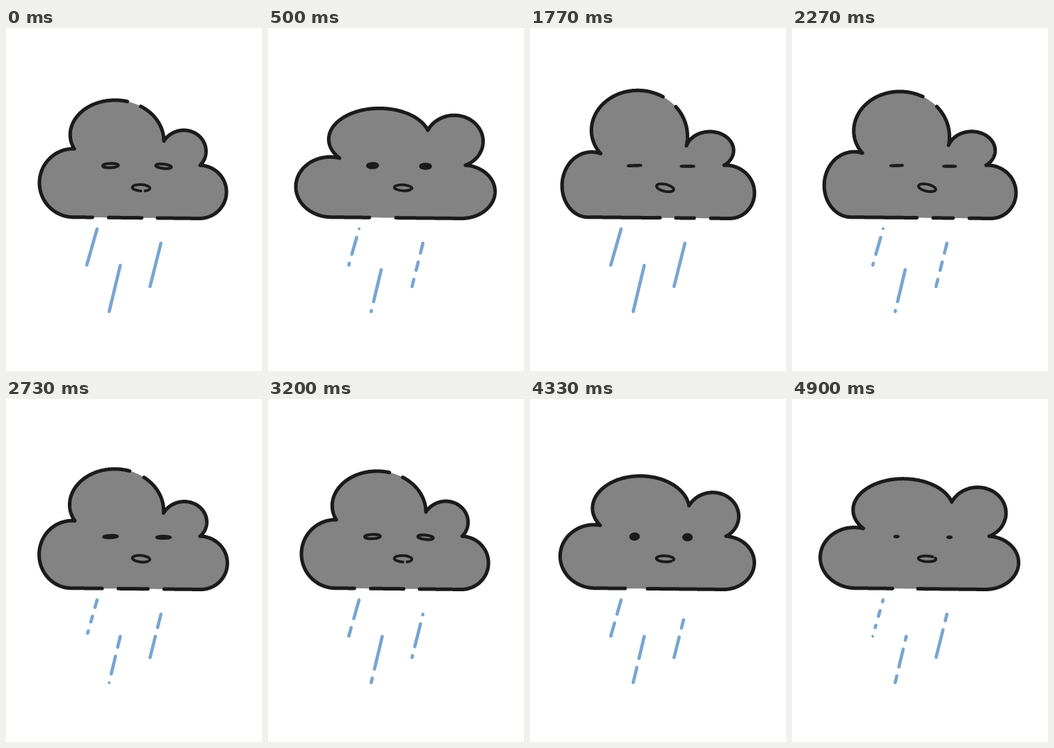
An HTML page with a canvas that plays this animation: 360x480 px, repeating every 5 s.

```html
<!DOCTYPE html>
<html lang="en">
<head>
<meta charset="utf-8">
<title>Rain cloud</title>
<style>
html, body { margin: 0; width: 100%; height: 100%; overflow: hidden; background: #fff; }
canvas { display: block; width: 100vw; height: 100vh; }
</style>
</head>
<body>
<canvas id="stage" width="360" height="480"></canvas>
<script>
const ctx = document.getElementById('stage').getContext('2d');
const INK = '#1c1a1b', GREY = '#838383', BLUE = '#78a5d1';
const LOOP = 5000, STEP = 80, RESTART = 4010;
const PEAK = 24.5, REST = 40;

// Lobes are ellipses: x, y, rx, ry; the side lobes stand on the floor: x, rx, ry
const rest = {
  big: [151.5, 154, 66, 53], puff: [251, 173.5, 31, 30],
  left: [95, 48, 48], right: [272, 38, 37], notchL: [96, 169], notchR: [222, 158]
};
const wide = {
  big: [157, 157, 73, 44], puff: [263, 158, 41, 37],
  left: [89, 50.5, 42.5], right: [272, 48, 38], notchL: [101, 183], notchR: [225, 142]
};
const tall = {
  big: [149, 144, 68, 63], puff: [254.5, 171, 34.5, 25],
  left: [75, 30.5, 41], right: [285, 33, 34], notchL: [101, 179], notchR: [219, 168]
};

// Eased value at a step between [step, value] keys
function track(keys, step) {
  const i = keys.findIndex(k => k[0] > step);
  if (i < 0) return keys.at(-1)[1];
  const [s0, a] = keys[i - 1], [s1, b] = keys[i];
  return a + (b - a) * (1 - Math.cos(Math.PI * (step - s0) / (s1 - s0))) / 2;
}

// 1 is squashed wide, -1 is stretched tall
function squashAt(step) {
  if (step > PEAK) return -((Math.max(0, REST - step) / (REST - PEAK)) ** 2);
  return track([[0, 0], [8, 1.1], [18, 0], [PEAK, -1]], step);
}

function shapeAt(squash) {
  const to = squash > 0 ? wide : tall, k = Math.abs(squash), shape = {};
  for (const part in rest) shape[part] = rest[part].map((v, i) => v + (to[part][i] - v) * k);
  return shape;
}

// Clockwise arc of an ellipse whose ends bend to meet two given points
function lobe([cx, cy, rx, ry], from, to) {
  const polar = ([x, y]) => {
    const u = (x - cx) / rx, v = (y - cy) / ry;
    return [Math.atan2(v, u), Math.hypot(u, v)];
  };
  const [a0, r0] = polar(from);
  let [a1, r1] = polar(to);
  if (a1 < a0) a1 += 2 * Math.PI;
  return Array.from({ length: 161 }, (_, i) => {
    const t = i / 160, a = a0 + (a1 - a0) * t;
    const r = 1 + (r0 - 1) * (1 - t) ** 4 + (r1 - 1) * t ** 4;
    return [cx + rx * r * Math.cos(a), cy + ry * r * Math.sin(a)];
  });
}

function line([x0, y0], [x1, y1]) {
  return Array.from({ length: 241 }, (_, i) => [x0 + (x1 - x0) * i / 240, y0 + (y1 - y0) * i / 240]);
}

function drawBody(squash) {
  const { big, puff, left, right, notchL, notchR } = shapeAt(squash);
  const out = Math.max(0, squash), up = Math.max(0, -squash);
  const notchLow = [273 + 5 * out, 192];
  const floorR = [right[0], 266.5], floorL = [left[0], 264.7];
  const side = ([x, rx, ry], floor) => [x, floor[1] - ry, rx, ry];

  const top = lobe(big, notchL, notchR), bottom = line(floorR, floorL);
  const parts = [top, lobe(puff, notchR, notchLow), lobe(side(right, floorR), notchLow, floorR),
    bottom, lobe(side(left, floorL), floorL, notchL)];

  ctx.beginPath();
  parts.flat().forEach(p => ctx.lineTo(...p));
  ctx.fillStyle = GREY;
  ctx.fill();

  // breaks in the ink line, as centre and width along x
  const topGaps = [[180.5 + 23 * up, 13 - 45 * out]];
  const floorGaps = [[133 + 30 * out + 90 * up, 17 + 15 * out],
    [202 + 60 * Math.abs(squash), squash < .4 ? 17 : 0]];
  ctx.beginPath();
  for (const part of parts) {
    const gaps = part === top ? topGaps : part === bottom ? floorGaps : [];
    let pen = false;
    for (const [x, y] of part) {
      const hidden = gaps.some(([c, w]) => w > 1 && Math.abs(x - c) < w / 2 + 2.5);
      if (!hidden) pen ? ctx.lineTo(x, y) : ctx.moveTo(x, y);
      pen = !hidden;
    }
  }
  ctx.strokeStyle = INK;
  ctx.lineWidth = 5;
  ctx.stroke();
}

function oval(x, y, rx, ry, tilt, width, fill = 'transparent', open = 0, gap = 0) {
  const rad = Math.PI / 180;
  ctx.beginPath();
  ctx.ellipse(x, y, rx, ry, tilt * rad, (open + gap) * rad, (open - gap + 360) * rad);
  ctx.fillStyle = fill;
  ctx.fill();
  ctx.lineWidth = width;
  ctx.stroke();
}

function drawFace(step, squash) {
  const rx = track([[0, 11], [4, 5.5], [6, 7], [11, 2.4], [15, 9.8], [28, 8.3], [REST, 11]], step);
  const ry = track([[0, 3], [4, 3.7], [11, .4], [28, .2], [REST, 3]], step);
  const lid = step < 2 || step > 34 ? GREY : INK;
  oval(147, 192.5, rx, ry, -2, 4, lid);
  oval(221.5, 193.5, rx, ry, lid === GREY ? 6 : 0, 4, lid);

  const open = track([[0, 76], [5, 25], [11, -38], [15, -72], [28, -30], [REST, 76]], step);
  oval(190, 223.6, 12.4, 4.5 - .6 * squash, 3 + 15 * Math.max(0, -squash), 3.8,
    GREY, open, squash < -.4 ? 0 : 14);
}

// Each streak: its two ends, and the steps at which a gap starts to fall along it
const RAIN_STEPS = 22, FALL_STEPS = 7;
const streaks = [
  { top: [128.7, 279], end: [113, 334], births: [.4, 5, 7, 9.6, 13.6] },
  { top: [161.2, 330], end: [144.6, 399], births: [0, 5.8, 9.6, 12.5] },
  { top: [218.4, 299], end: [202, 364], births: [1, 3.6, 9.1, 12.2, 17] }
];

function drawRain(step) {
  const gap = 8 * Math.min(1, (RAIN_STEPS - step) / 3);
  ctx.strokeStyle = BLUE;
  for (const { top: [x0, y0], end: [x1, y1], births } of streaks) {
    const falling = births.filter(b => b < step).reverse()
      .map(b => y0 + (y1 - y0) * (step - b) / FALL_STEPS)
      .flatMap(y => [y - gap / 2, y + gap / 2]);
    const cuts = [y0, ...falling.map(y => Math.min(y1, Math.max(y0, y))), y1];
    for (let c = 0; c < cuts.length; c += 2) {
      const w = Math.min(4.6, cuts[c + 1] - cuts[c]);
      if (w < 1) continue;
      ctx.beginPath();
      for (const y of [cuts[c] + w / 2, cuts[c + 1] - w / 2 + .01])
        ctx.lineTo(x0 + (x1 - x0) * (y - y0) / (y1 - y0), y);
      ctx.lineWidth = w;
      ctx.stroke();
    }
  }
}

function draw(step) {
  const squash = squashAt(step);
  ctx.fillStyle = '#fff';
  ctx.fillRect(0, 0, 360, 480);
  ctx.lineCap = ctx.lineJoin = 'round';
  drawBody(squash);
  drawFace(step, squash);
  drawRain((step < 42 ? step : 20 + (step - 42) / 3) % RAIN_STEPS);
}

// 80 ms drawings shown on a 30 fps clock; the final hold is drawn on twos
function stepAt(time) {
  const clock = Math.floor((time % LOOP + 5) * .03) / .03;
  const step = Math.floor((clock < RESTART ? clock : clock - RESTART) / STEP + 1e-6);
  return step < 42 ? step : Math.min(48, step - step % 2);
}

let shown = -1;
function tick() {
  const step = stepAt(performance.now());
  if (step !== shown) draw(shown = step);
  requestAnimationFrame(tick);
}
tick();
</script>
</body>
</html>
```
